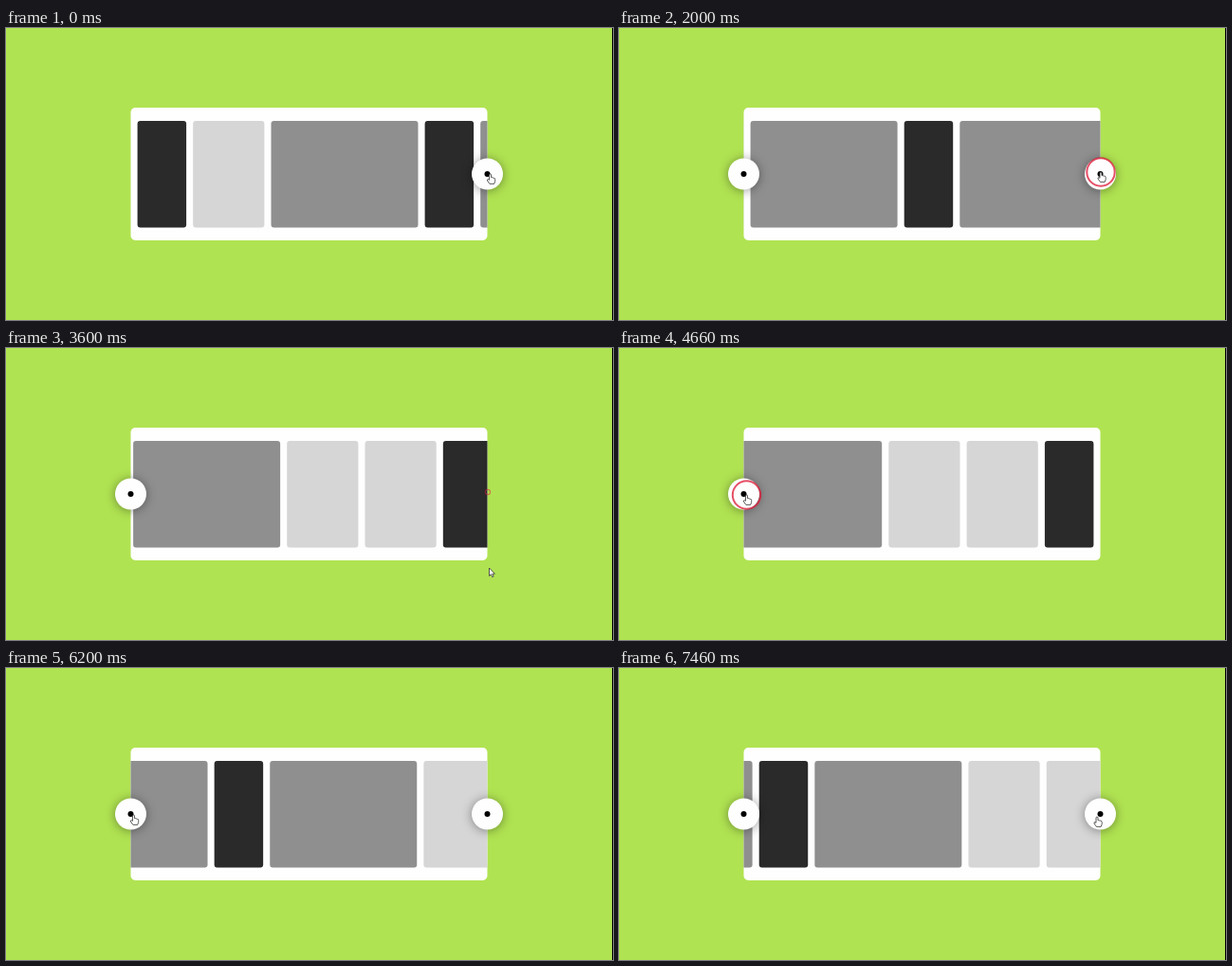
These frames come from a looping animation (640 by 308 pixels, 7530 ms). An HTML page with a canvas:

```html
<!DOCTYPE html>
<html lang="en">
<head>
<meta charset="utf-8">
<title>Carousel</title>
<style>
  html, body { margin: 0; width: 100%; height: 100%; overflow: hidden; background: #b0e352; }
  canvas { display: block; width: 640px; height: 308px; }
</style>
</head>
<body>
<canvas id="stage" width="640" height="308"></canvas>
<script>
const ctx = document.getElementById('stage').getContext('2d');
const LOOP = 7530;
const PANEL = { x: 131.5, y: 84, w: 376, h: 140 };
const RIGHT = PANEL.x + PANEL.w;
const MID_Y = 154;
const GAP = 7.1;
const KINDS = {
  D: { w: 51.5, color: '#2a2a2a' },
  L: { w: 75.2, color: '#d6d6d6' },
  G: { w: 155, color: '#8f8f8f' }
};

let edge = GAP;
const items = [...'DLGDGLLD'].map(kind => {
  const item = { ...KINDS[kind], x: edge };
  edge += item.w + GAP;
  return item;
});
const MAX_SCROLL = edge - PANEL.w;
const scrollTo = index => Math.min(items[index].x - GAP, MAX_SCROLL);

// Click time and the item brought to the left edge
const clicks = [
  [530, 1], [1330, 2], [2000, 3], [2660, 4], [3460, 5],
  [4660, 4], [5460, 3], [6000, 2], [7121, 3]
].map(([time, index]) => ({ time, scroll: scrollTo(index) }));
const SCROLL_MS = 400;
const RING_MS = 170;

// Pointer stops: time, x, y
const pointerPath = [
  [0, 510.5, 154], [60, 510.5, 154], [330, 508, 152], [3470, 508, 152],
  [3600, 509.5, 232], [3780, 480, 262], [4200, 207, 154], [4460, 134.5, 155],
  [6270, 134.5, 155], [6730, 488, 159], [6860, 500, 158], [7020, 504, 157],
  [LOOP, 504, 157]
];

const arrow = new Path2D('M0 0V8.4L1.9 6.7L3.2 9.6L4.6 9L3.3 6.2H5.9Z');
const hand = new Path2D(
  'M-1 6.3V1Q-1 0 0 0T1 1V3.6Q2 3.2 2.6 4Q3.6 3.6 4 4.4Q5.2 4.2 5.2 5.6' +
  'V7.6L4.2 10.4H-.6L-3 7Q-3.4 5.6-2.2 5.6Z');

const clamp = v => Math.max(0, Math.min(1, v));
const mix = (a, b, p) => a + (b - a) * p;
const swing = p => (1 - Math.cos(Math.PI * clamp(p))) / 2;

function scrollAt(t) {
  let pos = 0;
  for (const { time, scroll } of clicks) {
    if (t < time) break;
    pos = mix(pos, scroll, swing((t - time) / SCROLL_MS));
  }
  return pos;
}

function pointerAt(t) {
  const i = pointerPath.findIndex(stop => stop[0] > t);
  const [t0, x0, y0] = pointerPath[i - 1];
  const [t1, x1, y1] = pointerPath[i];
  const p = swing((t - t0) / (t1 - t0));
  return { x: mix(x0, x1, p), y: mix(y0, y1, p) };
}

const fadeIn = (t, start) => clamp((t - start - 60) / 250);
const leftAlpha = t => fadeIn(t, 530);
const rightAlpha = t => t < 4000 ? 1 - clamp((t - 3480) / 100) : fadeIn(t, 4660);

function roundRect(x, y, w, h, r, color) {
  ctx.fillStyle = color;
  ctx.beginPath();
  ctx.roundRect(x, y, w, h, r);
  ctx.fill();
}

function disc(x, y, r, color) {
  ctx.fillStyle = color;
  ctx.beginPath();
  ctx.arc(x, y, r, 0, Math.PI * 2);
  ctx.fill();
}

function drawPanel(scroll) {
  roundRect(PANEL.x, PANEL.y, PANEL.w, PANEL.h, 5, '#fefefe');
  ctx.save();
  ctx.beginPath();
  ctx.rect(PANEL.x, PANEL.y, PANEL.w, PANEL.h);
  ctx.clip();
  for (const { x, w, color } of items) {
    roundRect(PANEL.x + x - scroll, 98, w, 112.5, 3, color);
  }
  ctx.restore();
}

function drawButton(x, alpha) {
  if (!alpha) return;
  ctx.save();
  ctx.globalAlpha = alpha;
  ctx.shadowColor = 'rgba(0,0,0,.4)';
  ctx.shadowBlur = 11;
  ctx.shadowOffsetY = 1;
  disc(x, MID_Y, 16.5, '#fefefe');
  ctx.shadowColor = 'transparent';
  disc(x, MID_Y, 3, '#000');
  ctx.restore();
}

function drawRing(t) {
  const click = clicks.find(c => t >= c.time && t < c.time + RING_MS);
  if (!click) return;
  const left = 1 - (t - click.time) / RING_MS;
  const { x, y } = pointerAt(click.time);
  ctx.strokeStyle = `rgba(222,30,60,${mix(0.45, 0.78, left)})`;
  ctx.lineWidth = mix(1, 2, left);
  ctx.beginPath();
  ctx.arc(x, y, 14.7 * left, 0, Math.PI * 2);
  ctx.stroke();
}

function drawPointer(t) {
  const { x, y } = pointerAt(t);
  const over = (bx, alpha) => alpha > 0 && Math.hypot(x - bx, y - MID_Y) < 16.5;
  const shape = over(PANEL.x, leftAlpha(t)) || over(RIGHT, rightAlpha(t)) ? hand : arrow;
  ctx.save();
  ctx.translate(x, y);
  ctx.fillStyle = '#fff';
  ctx.strokeStyle = '#333';
  ctx.lineWidth = 0.8;
  ctx.lineJoin = 'round';
  ctx.fill(shape);
  ctx.stroke(shape);
  ctx.restore();
}

function draw(t) {
  ctx.fillStyle = '#b0e352';
  ctx.fillRect(0, 0, 640, 308);
  ctx.fillStyle = '#000';
  ctx.fillRect(639, 0, 1, 308);
  drawPanel(scrollAt(t));
  drawButton(PANEL.x, leftAlpha(t));
  drawButton(RIGHT, rightAlpha(t));
  drawRing(t);
  drawPointer(t);
}

let start;
function frame(now) {
  start ??= now;
  draw(Math.max(0, now - start) % LOOP);
  requestAnimationFrame(frame);
}
draw(0);
requestAnimationFrame(frame);
</script>
</body>
</html>
```
